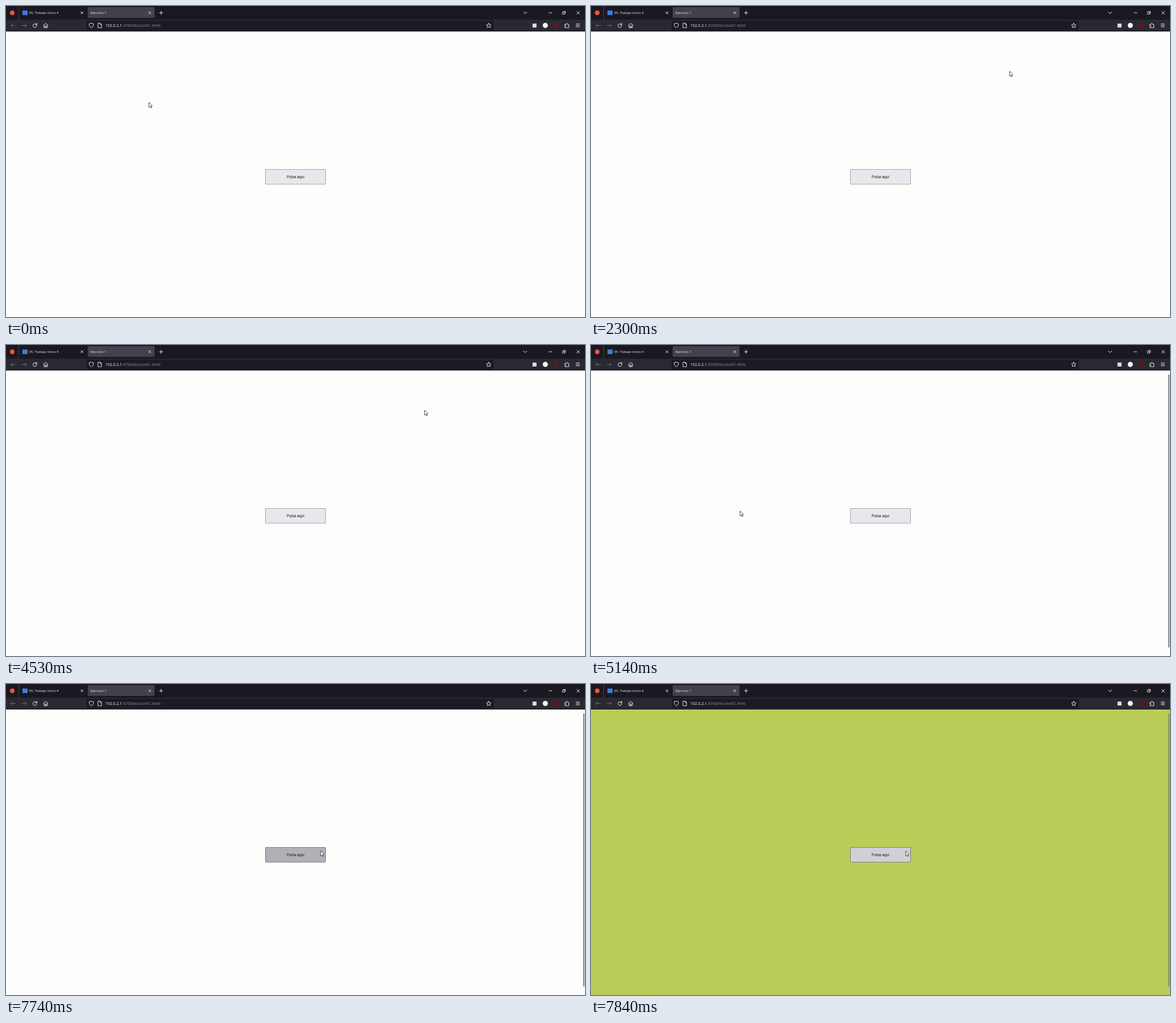
An HTML page with a canvas for the animation above (8 s loop, 1021 by 549 pixels).

```html
<!DOCTYPE html>
<html lang="es">
<head>
<meta charset="utf-8">
<title>Ejercicio 1</title>
<style>
  html, body { margin: 0; width: 100%; height: 100%; overflow: hidden; background: #fdfdfc; }
  canvas { display: block; width: 1021px; height: 549px; }
</style>
</head>
<body>
<canvas id="stage"></canvas>
<script>
const W = 1021, H = 549, LOOP = 8000;
const PRESS = 7700, RELEASE = 7800, RELOAD = 5140;
const BTN = { x: 457, y: 288, w: 107, h: 27 };
const UI_FONT = '"Open Sans", "Noto Sans", sans-serif';
const LIGHT = '#f4f4f8', DIM = '#74737c';

const canvas = document.getElementById('stage');
const ctx = canvas.getContext('2d');
const dpr = window.devicePixelRatio || 1;
canvas.width = W * dpr;
canvas.height = H * dpr;
ctx.scale(dpr, dpr);

// Pointer strokes: [time, x, y]; the pointer rests between strokes.
const strokes = [
  [[0, 252, 170], [30, 252, 170], [100, 264, 179]],
  [[260, 264, 179], [500, 430, 246], [820, 823, 160], [1060, 767, 116], [1160, 749, 114], [1330, 738, 115]],
  [[RELOAD, 263, 293], [5940, 450, 300], [6250, 540, 304], [6420, 569, 294],
   [6600, 563, 286.5], [6900, 557, 292], [7170, 555, 294.5]]
];

function slope(keys, i, axis) {
  if (i === 0 || i === keys.length - 1) return 0;
  const a = keys[i - 1], b = keys[i + 1];
  return (b[axis] - a[axis]) / (b[0] - a[0]);
}

function along(keys, t, axis) {
  const last = keys.length - 1;
  if (t >= keys[last][0]) return keys[last][axis];
  let i = 0;
  while (t >= keys[i + 1][0]) i++;
  const a = keys[i], b = keys[i + 1];
  const d = b[0] - a[0], u = (t - a[0]) / d;
  const e = u * u * (3 - 2 * u);
  return a[axis] + (b[axis] - a[axis]) * e
    + d * slope(keys, i, axis) * u * (1 - u) * (1 - u)
    - d * slope(keys, i + 1, axis) * u * u * (1 - u);
}

function pointerAt(t) {
  const keys = strokes.filter(s => s[0][0] <= t).pop();
  return { x: along(keys, t, 1), y: along(keys, t, 2) };
}

function rect(x, y, w, h, fill, r = 0) {
  ctx.fillStyle = fill;
  ctx.beginPath();
  ctx.roundRect(x, y, w, h, r);
  ctx.fill();
}

function disc(x, y, r, fill) {
  ctx.fillStyle = fill;
  ctx.beginPath();
  ctx.arc(x, y, r, 0, Math.PI * 2);
  ctx.fill();
}

function text(str, x, y, size, fill, family = UI_FONT) {
  ctx.font = `${size}px ${family}`;
  ctx.fillStyle = fill;
  ctx.fillText(str, x, y);
  return x + ctx.measureText(str).width;
}

function icon(x, y, d, color = LIGHT, width = 0.9) {
  ctx.save();
  ctx.translate(x, y);
  ctx.strokeStyle = color;
  ctx.lineWidth = width;
  ctx.lineJoin = ctx.lineCap = 'round';
  ctx.stroke(new Path2D(d));
  ctx.restore();
}

const CROSS = 'M-2-2L2 2M2-2L-2 2';

function drawTabs() {
  rect(0, 0, W, 24, '#1a1921');
  disc(11, 12, 4.2, '#f0523c');
  rect(22, 0, 1, 24, '#42414b');
  rect(29, 8, 9, 8, '#3b7de0');
  text('05. Trabajo Inicio 4', 40.5, 14.3, 6, LIGHT);
  icon(134, 12, CROSS);

  rect(144, 2, 118, 19, '#42414d', 2);
  text('Ejercicio 1', 149, 14.3, 6, LIGHT);
  icon(253.5, 12, CROSS);
  icon(273.5, 12, 'M-3 0H3M0-3V3');

  icon(915.5, 12, 'M-3-1.5L0 1.5L3-1.5', LIGHT, 1);
  icon(960, 12, 'M-2.5 0H2.5');
  icon(984, 12, 'M-2.5-1H1V2.5H-2.5ZM-1-1V-2.5H2.5V1H1', LIGHT, 0.8);
  icon(1009, 12, 'M-2.5-2.5L2.5 2.5M2.5-2.5L-2.5 2.5');
}

function drawToolbar() {
  rect(0, 24, W, 21, '#2a2931');
  rect(142, 26, 718, 17, '#1c1b23', 2);
  rect(0, 44, W, 1, '#15131f');

  icon(12.5, 34.5, 'M4 0H-4M-1-3L-4 0L-1 3', DIM);
  icon(32, 34.5, 'M-4 0H4M1-3L4 0L1 3', DIM);
  icon(51, 34.5, 'M3.2 0.5A3.3 3.3 0 1 1 2-2.5M3.4-4V-1.3H.7', LIGHT, 1);
  icon(70, 34.5, 'M-4-.3L0-4L4-.3M-3-1V3.7H3V-1M-1 3.5V.8H1V3.5');

  icon(150.5, 34.3, 'M0-4L3.8-2.7C3.8 1 2.5 3 0 4.2C-2.5 3-3.8 1-3.8-2.7Z');
  icon(165.5, 34.3, 'M-3-4H.8L3-1.7V4H-3ZM.6-3.8V-1.5H2.8');
  const end = text('192.0.2.1', 175, 37.3, 7, LIGHT);
  text(':4700/leccion01.html', end, 37.3, 7, '#92919b');
  icon(851.3, 34.3, 'M0-4L1.2-1.4L4-1L2 1L2.5 3.8L0 2.5L-2.5 3.8L-2 1L-4-1L-1.2-1.4Z');

  rect(928.5, 31, 7, 7, '#dddde3');
  disc(951, 34.2, 4.5, '#fbfbfe');
  disc(970, 34.2, 3.8, '#790d12');
  icon(989, 34.5, 'M-3.4-1.8H-1.2C-2-4.7 2-4.7 1.2-1.8H3.5V3.7H-3.4V1.7C-.7 2.3-.7-.6-3.4 0Z');
  icon(1008.3, 34.2, 'M-3-2.5H3M-3 0H3M-3 2.5H3');
}

function drawButton(hover, pressed) {
  const { x, y, w, h } = BTN;
  const border = pressed || hover ? '#676774' : '#8f8f9d';
  const face = pressed ? '#b0b0b6' : hover ? '#d0d0d7' : '#e8e8ec';
  rect(x, y, w, h, border, 2.2);
  rect(x + 0.8, y + 0.8, w - 1.6, h - 1.6, face, 1.5);
  ctx.textAlign = 'center';
  text('Pulsa aquí', x + w / 2, 304.3, 6.6, '#15151a', '"Liberation Sans", Arial, sans-serif');
  ctx.textAlign = 'left';
}

const ARROW = new Path2D('M0 0V9L2.1 7.2L3.4 10.1L4.9 9.4L3.6 6.6H6Z');

function drawPointer({ x, y }) {
  ctx.save();
  ctx.translate(x, y);
  ctx.fillStyle = '#fff';
  ctx.strokeStyle = '#24242b';
  ctx.lineWidth = 0.8;
  ctx.lineJoin = 'miter';
  ctx.fill(ARROW);
  ctx.stroke(ARROW);
  ctx.restore();
}

function draw(t) {
  const p = pointerAt(t);
  const hover = p.x >= BTN.x && p.x < BTN.x + BTN.w - 1 && p.y >= BTN.y && p.y < BTN.y + BTN.h;
  const clicked = t >= RELEASE;

  rect(0, 0, W, H, clicked ? '#b9cd58' : '#fdfdfc');
  drawTabs();
  drawToolbar();
  drawButton(hover, t >= PRESS && !clicked);
  if (t >= RELOAD) rect(1018.2, 52, 1.6, 482, clicked ? 'rgba(60,60,65,.5)' : 'rgba(50,50,56,.8)', 0.8);
  drawPointer(p);
}

const start = performance.now();
function tick() {
  draw((performance.now() - start) % LOOP);
  requestAnimationFrame(tick);
}
tick();
</script>
</body>
</html>
```
